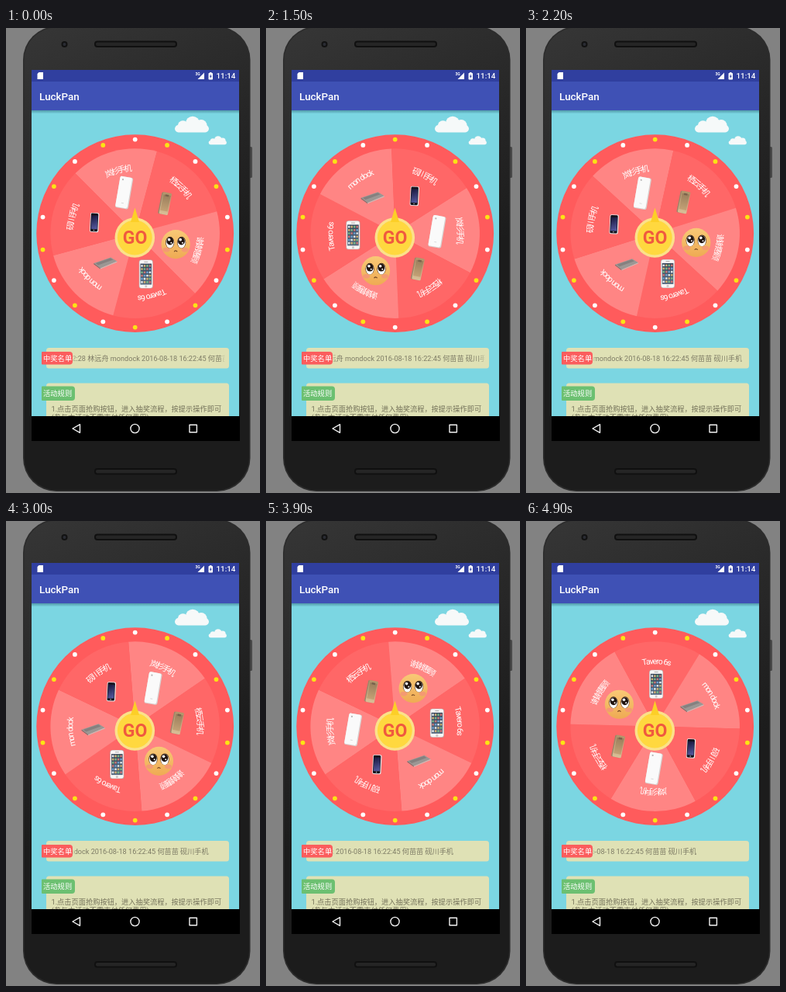
An HTML page with a canvas that plays this animation: 328x599 px, repeating every 5 s.

```html
<!DOCTYPE html>
<html lang="zh-CN">
<head>
<meta charset="utf-8">
<title>LuckPan</title>
<style>
  html, body { margin: 0; width: 100%; height: 100%; overflow: hidden; background: #828282; }
  canvas { display: block; width: 328px; height: 599px; }
</style>
</head>
<body>
<canvas id="stage"></canvas>
<script>
const W = 328, H = 599, LOOP = 5000, STEP = 100;
const canvas = document.getElementById('stage');
const ctx = canvas.getContext('2d');
const dpr = window.devicePixelRatio || 1;
canvas.width = W * dpr;
canvas.height = H * dpr;

const FONT = 'Roboto, "Noto Sans CJK SC", "Noto Sans CJK", sans-serif';
const CX = 166.7, CY = 264.6, RAD = Math.PI / 180;
const LEFT = 33, WIDE = 268;
const CREAM = '#dfe1b5', CYAN = '#7bd6e2';

// Wheel travel in degrees at given times; the cosine phase is linear in between
const START = -15, TRAVEL = 4156.5;
const KEYS = [[200, 0], [1100, 398.4], [1500, 822.6], [2200, 1797.5],
  [3000, 2920.5], [3900, 3880.5], [4620, TRAVEL]];
const PHASES = KEYS.map(([t, deg]) => [t, Math.acos(1 - 2 * deg / TRAVEL)]);

const PRIZES = [
  ['岚杉手机', whitePhone], ['栖云手机', goldPhone], ['谢谢惠顾', face],
  ['Tavero 6s', appPhone], ['mon dock', laptop], ['砚川手机', darkPhone]
];
const NEWS = '2016-08-18 16:22:28 林远舟 mondock 2016-08-18 16:22:45 何苗苗 砚川手机';

function wheelAngle(t) {
  if (t <= PHASES[0][0]) return START;
  let phase = Math.PI;
  for (let i = 1; i < PHASES.length; i++) {
    const [t0, p0] = PHASES[i - 1], [t1, p1] = PHASES[i];
    if (t < t1) { phase = p0 + (p1 - p0) * (t - t0) / (t1 - t0); break; }
  }
  return START + TRAVEL * (1 - Math.cos(phase)) / 2;
}

function rect(x, y, w, h, fill, r = 0) {
  ctx.fillStyle = fill;
  ctx.beginPath();
  ctx.roundRect(x, y, w, h, r);
  ctx.fill();
}

function disc(x, y, r, fill, ry = r) {
  ctx.fillStyle = fill;
  ctx.beginPath();
  ctx.ellipse(x, y, r, ry, 0, 0, 7);
  ctx.fill();
}

function poly(points, fill) {
  ctx.fillStyle = fill;
  ctx.beginPath();
  points.forEach(([x, y]) => ctx.lineTo(x, y));
  ctx.closePath();
  ctx.fill();
}

function text(str, x, y, size, fill, align = 'left', weight = 400) {
  ctx.font = `${weight} ${size}px ${FONT}`;
  ctx.textAlign = align;
  ctx.textBaseline = 'alphabetic';
  ctx.fillStyle = fill;
  ctx.fillText(str, x, y);
}

function fade(x0, y0, x1, y1, from, to) {
  const g = ctx.createLinearGradient(x0, y0, x1, y1);
  g.addColorStop(0, from);
  g.addColorStop(1, to);
  return g;
}

function at(x, y, turn, draw) {
  ctx.save();
  ctx.translate(x, y);
  ctx.rotate(turn);
  draw();
  ctx.restore();
}

// Prize pictures, each drawn around its own centre
function whitePhone() {
  ctx.rotate(0.17);
  rect(-8.5, -20.5, 17, 41, '#d8d2d1', 2.5);
  rect(-8.5, -20.5, 15.7, 40, '#fafafa', 2.5);
  disc(-4.5, -16.5, 1.1, '#b5b5b5');
  rect(-1.5, 13, 3, 1, '#d8d8d8');
}

function goldPhone() {
  ctx.rotate(0.2);
  rect(-6.5, -14, 11, 28, '#9c8468', 1.5);
  rect(-5, -14.5, 11.5, 28.5, fade(0, -14, 0, 14, '#b3946b', '#d9bf97'), 1.5);
  rect(-4, -11.5, 9.5, 21, fade(0, -11, 0, 10, '#9b7f5d', '#c4a276'));
  rect(-1.5, -12, 4.5, 2.5, '#79634c');
}

function darkPhone() {
  ctx.rotate(0.05);
  rect(-5.7, -12.5, 11.4, 25, '#eeebee', 2);
  rect(-4.9, -11.8, 9.4, 23.4, '#15131d', 1.5);
  rect(-4.2, -9, 8, 17.5, fade(-4, -9, 4, 9, '#17163a', '#5a5fa8'));
  disc(-0.3, 10, 0.8, '#bbb');
}

function laptop() {
  poly([[-15, 0], [7, -7.5], [15, -2.5], [-6.5, 6.5]], '#9b9794');
  poly([[-15, 0], [-6.5, 6.5], [-6.5, 7.5], [-15, 1.2]], '#6e6866');
  poly([[-6.5, 6.5], [15, -2.5], [15, -1.3], [-6.5, 7.5]], '#c6c0bd');
  poly([[-12.5, 0], [6.5, -6.5], [10, -4.4], [-9.3, 2.6]], '#85807f');
}

function appPhone() {
  rect(-9, -18.5, 18, 37, '#b9b4b4', 3.2);
  rect(-8.4, -18, 16.8, 36, '#f8f6f6', 3);
  rect(-7.3, -13.5, 14.6, 27, fade(0, -13, 0, 13, '#39485c', '#566a80'));
  const tints = ['#dfe5e8', '#79b886', '#6d9fcf', '#d1ae72', '#c97777'];
  for (let i = 0; i < 24; i++) {
    rect(-6.5 + (i % 4) * 3.5, -12 + (i >> 2) * 4.2, 2.5, 2.6, tints[(i * 3 + (i >> 2)) % 5], 0.6);
  }
  rect(-2.5, -16.2, 5, 0.8, '#999');
  disc(0, 15.8, 1.5, '#c9c5c5');
}

function face() {
  disc(0, 0, 18.6, fade(0, -18, 0, 18, '#f8c875', '#efab54'));
  for (const s of [-1, 1]) {
    disc(s * 12, 7, 4.5, '#f49a72', 2.8);
    disc(s * 7.5, -2.5, 5.6, '#3a2417', 7.4);
    disc(s * 7.5, -2, 5, '#fff', 6.9);
    disc(s * 7.3, -4, 4.4, '#20140f', 4.9);
    disc(s * 7.3 - 1.2, -6, 1.8, '#fff');
    disc(s * 7.3 + 1.5, -2, 1, '#fff');
  }
  ctx.strokeStyle = '#6d4020';
  ctx.lineWidth = 1.1;
  ctx.beginPath();
  ctx.arc(0, 10.5, 2.2, Math.PI * 1.15, Math.PI * 1.85);
  ctx.stroke();
}

function arcLabel(str, mid) {
  const size = 10.6, r = 84.3, tight = 0.79;
  ctx.font = `400 ${size}px ${FONT}`;
  const widths = [...str].map(c => ctx.measureText(c).width * tight);
  let pos = -widths.reduce((a, b) => a + b) / 2;
  [...str].forEach((c, i) => {
    const a = mid + (pos + widths[i] / 2) / r;
    at(CX + r * Math.sin(a), CY - r * Math.cos(a), a, () => text(c, 0, 3.9, size, '#fff', 'center'));
    pos += widths[i];
  });
}

function wheel(t) {
  disc(CX, CY, 127.4, '#ff5b5c');
  const turn = wheelAngle(t) * RAD, step = 60 * RAD;
  PRIZES.forEach((_, i) => {
    const a = turn + i * step - Math.PI / 2;
    ctx.fillStyle = i % 2 ? '#ff6767' : '#ff8584';
    ctx.beginPath();
    ctx.moveTo(CX, CY);
    ctx.arc(CX, CY, 109.3, a - step / 2, a + step / 2);
    ctx.fill();
  });
  PRIZES.forEach(([label, draw], i) => {
    const a = turn + i * step;
    arcLabel(label, a);
    at(CX + 54.3 * Math.sin(a), CY - 54.3 * Math.cos(a), 0, draw);
  });

  const blink = Math.floor((t + 300) / 500);
  for (let i = 0; i < 18; i++) {
    const a = i * 20 * RAD;
    disc(CX + 121 * Math.sin(a), CY - 121 * Math.cos(a), 2.9, (i + blink) % 2 ? '#fbe414' : '#fff');
  }

  disc(166.3, 270, 25.8, '#fbe18a');
  disc(166.3, 270, 22.4, '#ffd83f');
  poly([[166.5, 231.5], [172, 250], [161, 250]], '#fccf27');
  text('GO', 166.5, 278.2, 23, '#f0593f', 'center', 700);
}

function tag(y, w, h, fill, label) {
  rect(46, y, w, h, fill, [1, 4, 4, 1]);
  text(label, 48, y + h / 2 + 3.5, 9.3, '#fff', 'left', 500);
}

function notices(t) {
  const clear = 'rgba(223,225,181,0)';
  rect(52, 412, 236, 26.5, CREAM, 3.5);
  ctx.save();
  ctx.beginPath();
  ctx.rect(85, 414, 198, 22);
  ctx.clip();
  text(NEWS, 327 - 0.0218 * t, 428.8, 9.15, '#7d7b65', 'right');
  rect(85, 414, 6, 22, fade(85, 0, 91, 0, CREAM, clear));
  rect(276, 414, 7, 22, fade(276, 0, 283, 0, clear, CREAM));
  ctx.restore();
  tag(417, 40, 16.5, '#fb5d5d', '中奖名单');

  rect(52, 457.5, 236, 60, CREAM, 3.5);
  text('1.点击页面抢购按钮，进入抽奖流程，按提示操作即可', 58.5, 493.9, 9.22, '#737159');
  text('(参与本活动不需支付任何费用)', 58.5, 504.6, 9.22, '#737159');
  tag(461.5, 43, 18.5, '#6cc071', '活动规则');
}

function cloud(x, y, k) {
  const white = '#f6f9f9';
  ctx.save();
  ctx.translate(x, y);
  ctx.scale(k, k);
  rect(-22, 0, 44, 9.5, white, 4.7);
  disc(-11.5, 1, 6.8, white);
  disc(1, -2.3, 9, white);
  disc(12, 0.6, 7.5, white);
  ctx.restore();
}

function device() {
  rect(0, 0, W, H, '#828282');
  rect(314, 153, 4, 40, '#4a4a4a', 1.5);
  rect(22, -2, 293.5, 599, '#2c2c2c', 43);
  rect(23.5, -0.5, 290.5, 596, fade(23, 0, 200, 330, '#363636', '#1c1c1c'), 42);
  for (const y of [16.5, 567]) {
    rect(114, y, 107, 8.5, '#101010', 4);
    rect(116, y + 2, 103, 4.5, '#252525', 2);
  }
  disc(75.5, 21, 4, '#121212');
  disc(75.5, 21, 2, '#2a2c33');
}

function bars() {
  rect(LEFT, 106, WIDE, 4.5, fade(0, 106, 0, 110.5, 'rgba(0,40,60,.35)', 'rgba(0,40,60,0)'));
  rect(LEFT, 54, WIDE, 15.5, '#303f9f');
  rect(LEFT, 69, WIDE, 37, '#3f51b5');
  text('LuckPan', 43, 93, 13.4, '#fff', 'left', 500);

  poly([[42.5, 57], [48, 57], [48, 66], [40.5, 66], [40.5, 59]], '#fff');
  text('3G', 244.5, 60.5, 5, '#fff', 'left', 700);
  poly([[256, 57.5], [256, 66], [247.5, 66]], '#fff');
  rect(261.5, 58, 5.5, 8.5, '#fff', 0.8);
  rect(263, 57, 2.5, 1.2, '#fff');
  poly([[264.8, 59.3], [262.8, 62.8], [264, 62.8], [263.7, 65.2], [265.8, 61.8], [264.6, 61.8]], '#303f9f');
  text('11:14', 271.5, 65.2, 9.8, '#fff', 'left', 500);

  rect(LEFT, 500, WIDE + 1, 32, '#000');
  ctx.strokeStyle = '#f2f2f2';
  ctx.lineWidth = 1.4;
  ctx.lineJoin = 'round';
  ctx.beginPath();
  ctx.moveTo(86, 516);
  ctx.lineTo(95.5, 510.7);
  ctx.lineTo(95.5, 521.3);
  ctx.closePath();
  ctx.stroke();
  ctx.beginPath();
  ctx.arc(166.5, 516, 5.6, 0, 7);
  ctx.stroke();
  ctx.strokeRect(237, 511.3, 9.4, 9.4);
}

function render(t) {
  ctx.setTransform(dpr, 0, 0, dpr, 0, 0);
  device();
  rect(LEFT, 54, WIDE, 446, CYAN);
  cloud(240, 125, 1);
  cloud(273.3, 145.2, 0.53);
  wheel(t);
  notices(t);
  bars();
}

const begin = performance.now();
function tick() {
  const t = (performance.now() - begin) % LOOP;
  render(Math.floor(t / STEP) * STEP);
  requestAnimationFrame(tick);
}
tick();
</script>
</body>
</html>
```
